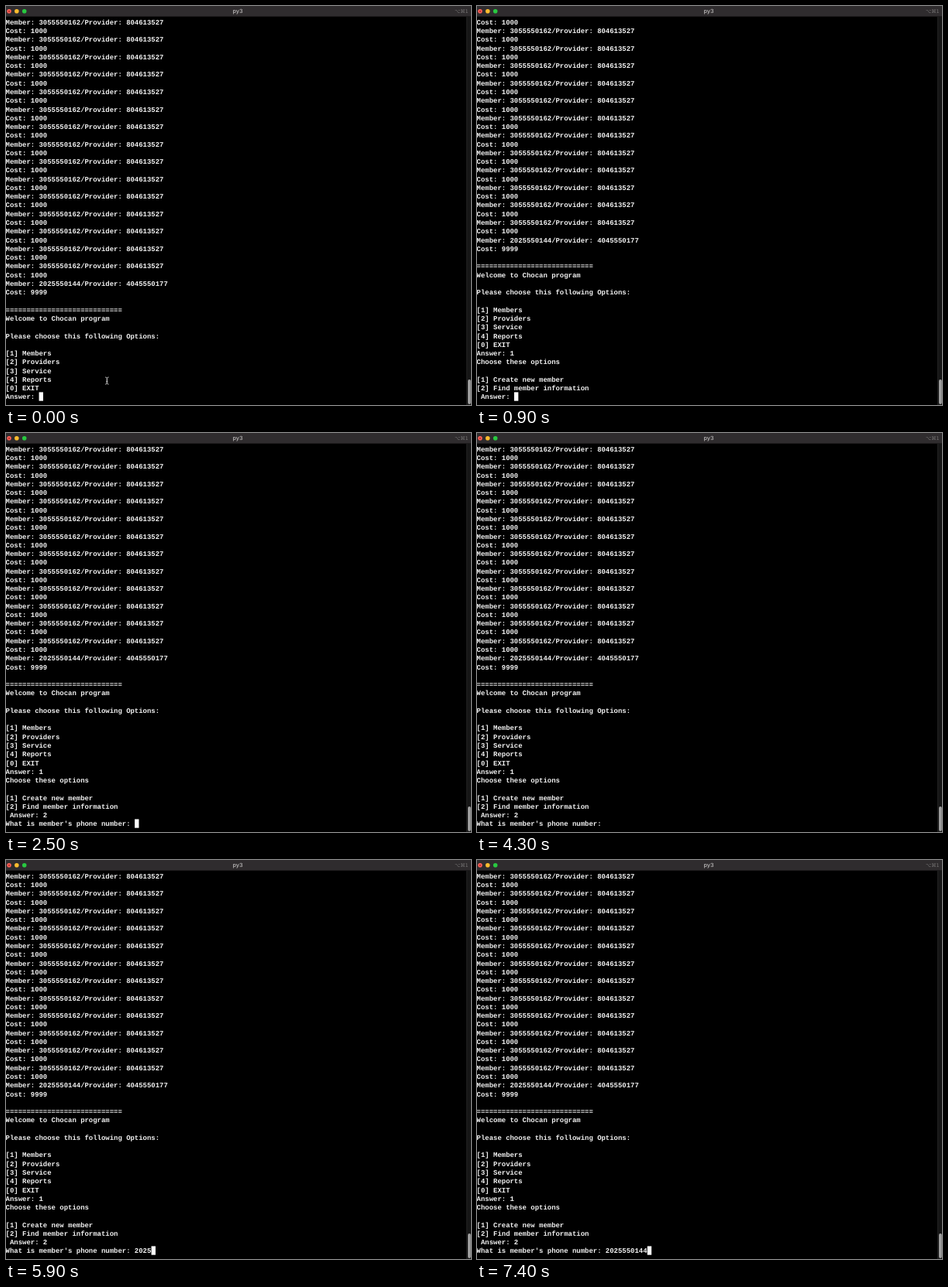
An HTML page that plays this animation: 600x516 px, repeating every 8 s.

```html
<!DOCTYPE html>
<html lang="en">
<head>
<meta charset="utf-8">
<title>py3</title>
<style>
  html, body { margin: 0; width: 100%; height: 100%; overflow: hidden; background: #000; }
  svg { display: block; width: 600px; height: 516px; }
  text { white-space: pre; text-rendering: geometricPrecision; }
  #rows text { font: 700 8.95px "Liberation Mono", "DejaVu Sans Mono", monospace; fill: #f2f2f2; }
  .title { font: 600 7.2px Inter, "Open Sans", sans-serif; fill: #b0aeae; text-anchor: middle; }
  .key { font: 6.3px "DejaVu Sans", sans-serif; fill: #757373; text-anchor: end; }
</style>
</head>
<body>
<svg viewBox="0 0 600 516">
  <rect width="600" height="516"/>
  <rect x="594" y="14" width="6" height="502" fill="#161616"/>
  <rect x="594" y="14" width="0.6" height="502" fill="#2c2c2c"/>
  <rect x="596" y="483" width="3.8" height="32" rx="1.9" fill="#a0a0a0"/>

  <rect width="600" height="13.6" fill="#2f2c2e"/>
  <circle cx="4" cy="6.8" r="2.8" fill="#fe5f57"/>
  <circle cx="4" cy="6.8" r="0.9" fill="#8c1a10"/>
  <circle cx="13.8" cy="6.8" r="2.8" fill="#febc2e"/>
  <circle cx="23.7" cy="6.8" r="2.8" fill="#28c840"/>
  <text class="title" x="299" y="9.2">py3</text>
  <text class="key" x="596.6" y="9">⌥⌘1</text>

  <g transform="translate(-0.4 0)">
    <g id="rows"></g>
    <rect id="caret" y="499.4" width="5.4" height="11.3" fill="#fff"/>
  </g>
  <path id="mouse" d="M128 480q2.3 0 2.3 1.6v6q0 1.6-2.3 1.6M132.6 480q-2.3 0-2.3 1.6v6q0 1.6 2.3 1.6M129.2 485.7h2.2"
        fill="none" stroke="#c4c4c4" stroke-width="0.9"/>
</svg>
<script>
  const LOOP = 8000, ROWS = 44, PITCH = 11.27, FIRST = 23.8, CELL = 5.37;

  const visit = (member, provider, cost) =>
    [`Member: ${member}/Provider: ${provider}`, `Cost: ${cost}`];

  const log = [
    ...Array.from({ length: 15 }, () => visit("3055550162", "804613527", 1000)).flat(),
    ...visit("2025550144", "4045550177", 9999),
    "",
    "=".repeat(28),
    "Welcome to Chocan program",
    "",
    "Please choose this following Options:",
    "",
    "[1] Members",
    "[2] Providers",
    "[3] Service",
    "[4] Reports",
    "[0] EXIT",
    "Answer: 1",
    "Choose these options",
    "",
    "[1] Create new member",
    "[2] Find member information",
    " Answer: 2",
    "What is member's phone number: 2025550144"
  ];

  // start time, lines printed, characters typed, caret shown
  const steps = [
    [0, 44, 0, 1], [200, 44, 0, 0], [600, 44, 1, 1],
    [900, 49, 0, 1], [1200, 49, 0, 0], [1700, 49, 0, 1], [2200, 49, 1, 1],
    [2500, 50, 0, 1], [3200, 50, 0, 0], [3700, 50, 0, 1], [4300, 50, 0, 0],
    ...[4800, 4900, 5100, 5900, 6000, 6200, 6800, 7000, 7100, 7400]
      .map((t, i) => [t, 50, i + 1, 1])
  ];

  const byId = id => document.getElementById(id);
  const caret = byId("caret"), mouse = byId("mouse");
  const rows = Array.from({ length: ROWS }, (_, i) => {
    const row = document.createElementNS("http://www.w3.org/2000/svg", "text");
    row.setAttribute("x", 0);
    row.setAttribute("y", (FIRST + i * PITCH).toFixed(2));
    return byId("rows").appendChild(row);
  });

  function show([start, end, typed, lit]) {
    const lines = log.slice(end - ROWS, end);
    const prompt = lines[ROWS - 1];
    const length = prompt.lastIndexOf(": ") + 2 + typed;
    lines[ROWS - 1] = prompt.slice(0, length);
    rows.forEach((row, i) => { row.textContent = lines[i]; });
    caret.setAttribute("x", (length * CELL).toFixed(2));
    caret.style.visibility = lit ? "visible" : "hidden";
    mouse.style.visibility = start < 600 ? "visible" : "hidden";
  }

  let current;
  function tick() {
    const t = performance.now() % LOOP;
    const step = steps.findLast(s => s[0] <= t);
    if (step !== current) show(current = step);
    requestAnimationFrame(tick);
  }
  tick();
</script>
</body>
</html>
```
